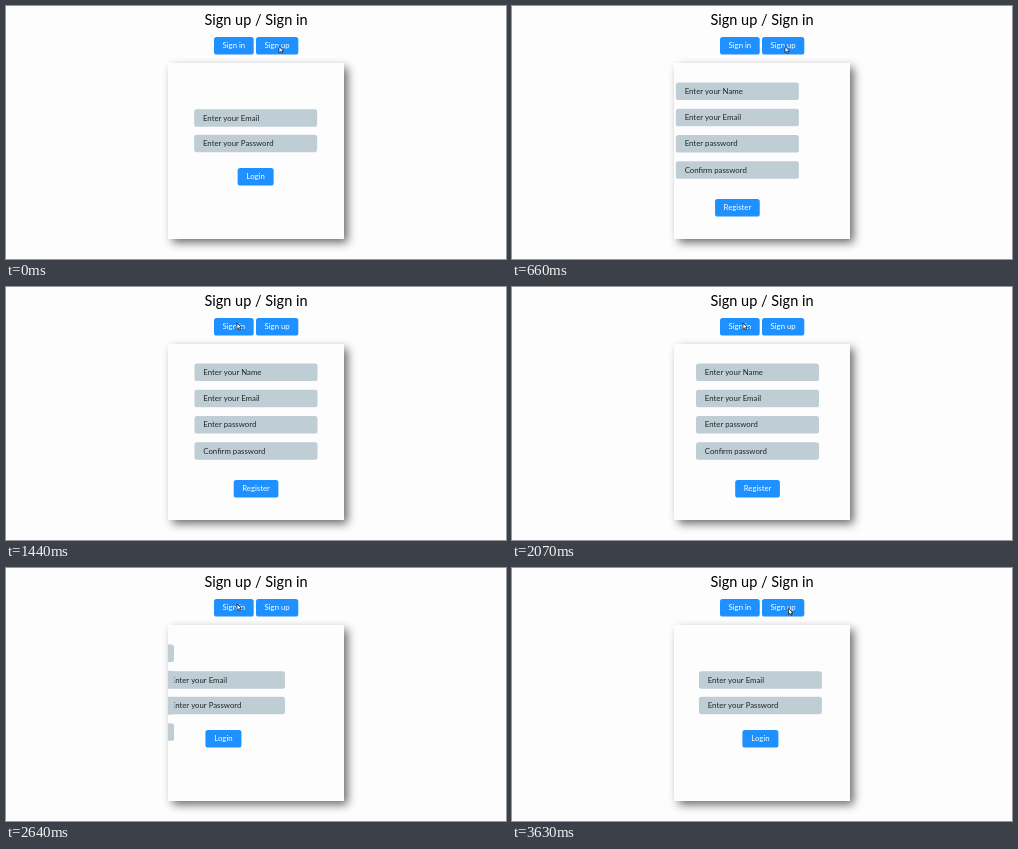
An HTML page with a canvas that plays this animation: 500x253 px, repeating every 3660 ms.

```html
<!DOCTYPE html>
<html lang="en">
<head>
<meta charset="utf-8">
<title>Sign up / Sign in</title>
<style>
  html, body { margin: 0; width: 100%; height: 100%; overflow: hidden; background: #fdfdfd; }
  canvas { display: block; width: 500px; height: 253px; }
</style>
</head>
<body>
<canvas id="stage"></canvas>
<script>
const W = 500, H = 253, LOOP = 3660, STEP = 30, SLIDE = 750;
const PAGE = '#fdfdfd', BLUE = '#1e90ff', FIELD = '#bfced5';
const CARD = { x: 162, y: 57, size: 176 };

const canvas = document.getElementById('stage');
const ctx = canvas.getContext('2d');
const ratio = window.devicePixelRatio || 1;
canvas.width = W * ratio;
canvas.height = H * ratio;

const clamp = v => Math.min(1, Math.max(0, v));
const mix = (a, b, p) => a + (b - a) * p;

// cubic-bezier(.42, 0, 1, 1)
function easeIn(x) {
  if (x <= 0 || x >= 1) return clamp(x);
  let lo = 0, hi = 1;
  for (let i = 0; i < 24; i++) {
    const s = (lo + hi) / 2, r = 1 - s;
    if (1.26 * s * r * r + 3 * s * s * r + s * s * s < x) lo = s;
    else hi = s;
  }
  return lo * lo * (3 - 2 * lo);
}

const slide = (t, start) => easeIn((t - start) / SLIDE);

// 0: login form showing, 1: register form showing
function formState(t) {
  if (t < 1500) return slide(t, -25);
  if (t < 3400) return 1 - slide(t, 1977);
  return slide(t, 3576);
}

function cursorAt(t) {
  if (t < 2700) {
    const p = clamp((t - 930) / 510), e = p * p * (3 - 2 * p);
    return [mix(273, 231, e), mix(40.5, 36, e)];
  }
  const e = 1 - Math.pow(1 - clamp((t - 2925) / 405), 2.2);
  return [mix(231, 276.5, e), mix(36, 40.5, Math.min(1, e * 1.6))];
}

function box(x, y, w, h, color) {
  ctx.fillStyle = color;
  ctx.beginPath();
  ctx.roundRect(x, y, w, h, 2.6);
  ctx.fill();
}

function label(str, x, y, size, color, align) {
  ctx.font = size + 'px Lato, "Open Sans", sans-serif';
  ctx.fillStyle = color;
  ctx.textAlign = align;
  ctx.fillText(str, x, y);
}

function button(str, x, y, w) {
  box(x, y, w, 17.5, BLUE);
  label(str, x + w / 2, y + 11.3, 7.8, '#fff', 'center');
}

function field(str, y) {
  box(188.5, y, 123, 17.5, FIELD);
  label(str, 197.3, y + 11.2, 7.8, '#20262a', 'left');
}

function loginForm() {
  field('Enter your Email', 103.3);
  field('Enter your Password', 128.7);
  button('Login', 232, 162, 36);
}

function registerForm() {
  ['Enter your Name', 'Enter your Email', 'Enter password', 'Confirm password']
    .forEach((str, i) => field(str, 76.6 + i * 26.25));
  button('Register', 227.7, 193, 44.7);
}

function shifted(form, dx) {
  ctx.save();
  ctx.translate(dx, 0);
  form();
  ctx.restore();
}

function card(state) {
  const { x, y, size } = CARD;
  ctx.save();
  ctx.shadowColor = 'rgba(0,0,0,.6)';
  ctx.shadowOffsetX = ctx.shadowOffsetY = 3.5 * ratio;
  ctx.shadowBlur = 9 * ratio;
  ctx.fillStyle = PAGE;
  ctx.fillRect(x, y, size, size);
  ctx.restore();

  ctx.save();
  ctx.beginPath();
  ctx.rect(x, y, size, size);
  ctx.clip();
  shifted(loginForm, -size * state);
  shifted(registerForm, -size * (1 - state));
  ctx.restore();
}

function cursor(x, y) {
  ctx.save();
  ctx.translate(x, y);
  ctx.beginPath();
  ctx.moveTo(0, 0);
  ctx.lineTo(0, 6.2);
  ctx.lineTo(1.5, 4.9);
  ctx.lineTo(2.5, 7);
  ctx.lineTo(3.5, 6.5);
  ctx.lineTo(2.6, 4.5);
  ctx.lineTo(4.5, 4.4);
  ctx.closePath();
  ctx.lineWidth = 0.7;
  ctx.lineJoin = 'round';
  ctx.strokeStyle = '#111';
  ctx.fillStyle = '#fff';
  ctx.fill();
  ctx.stroke();
  ctx.restore();
}

function draw(t) {
  ctx.setTransform(ratio, 0, 0, ratio, 0, 0);
  ctx.fillStyle = PAGE;
  ctx.fillRect(0, 0, W, H);
  label('Sign up / Sign in', 250, 19, 14.5, '#000', 'center');
  button('Sign in', 208, 31, 39.7);
  button('Sign up', 250, 31, 42.3);
  card(formState(t));
  cursor(...cursorAt(t));
}

const begin = performance.now();
function tick() {
  const t = (performance.now() - begin) % LOOP;
  draw(Math.floor(t / STEP) * STEP);
  requestAnimationFrame(tick);
}
tick();
</script>
</body>
</html>
```
